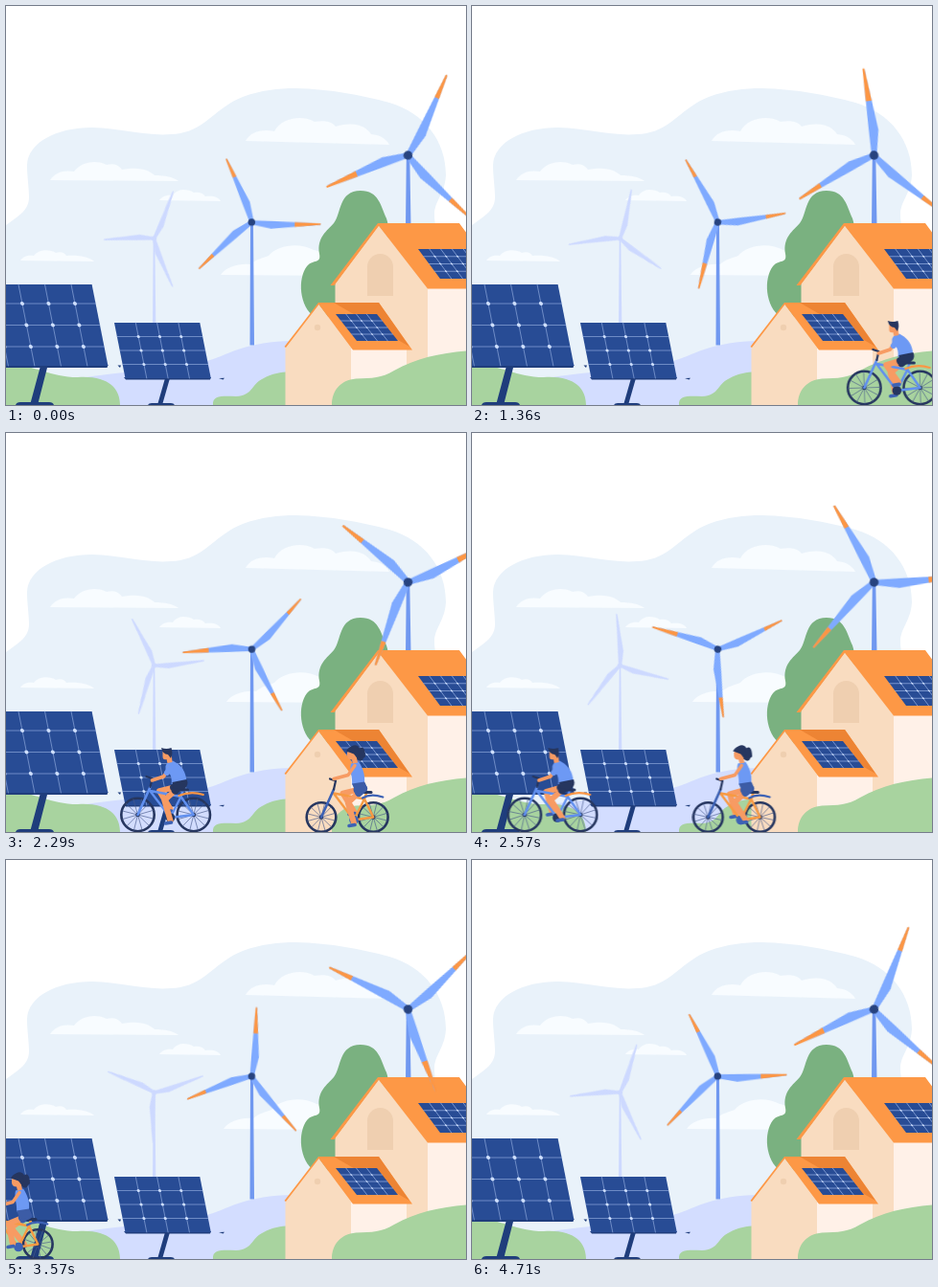
These frames come from a looping animation (480 by 417 pixels, 4780 ms). An HTML page:

```html
<!DOCTYPE html>
<html lang="en">
<head>
<meta charset="utf-8">
<title>Green energy village</title>
<style>
html, body { margin: 0; width: 100%; height: 100%; overflow: hidden; background: #fff; }
svg { display: block; width: 100vw; height: 100vh; }
.spin { animation: spin 4780ms -2ms infinite; }
.ride { animation: ride 4780ms -2ms infinite; }
.sway { animation: sway 4780ms -2ms infinite; }
/* The loop advances in 67 equal steps. */
@keyframes spin {
  0% { transform: rotate(0deg); animation-timing-function: steps(32); }
  47.7612% { transform: rotate(175.7deg); animation-timing-function: steps(18); }
  74.6269% { transform: rotate(272.3deg); animation-timing-function: steps(16); }
  98.5075% { transform: rotate(357.1deg); animation-timing-function: steps(1); }
  100% { transform: rotate(360deg); }
}
@keyframes ride {
  0% { transform: translateX(634px); animation-timing-function: steps(1); }
  11.9403% { transform: translateX(634px); animation-timing-function: steps(18); }
  38.806% { transform: translateX(265.5px); animation-timing-function: steps(6); }
  47.7612% { transform: translateX(137px); animation-timing-function: steps(9); }
  61.194% { transform: translateX(-49px); animation-timing-function: steps(9); }
  74.6269% { transform: translateX(-213px); animation-timing-function: steps(8); }
  86.5672%, 100% { transform: translateX(-320px); }
}
@keyframes sway {
  0%, 100% { transform: translateX(0); animation-timing-function: ease-in-out; }
  50% { transform: translateX(6px); animation-timing-function: ease-in-out; }
}
.rotor { --blade: #7faaff; --tip: #fc9644; --hub: #27437f; }
.pale { --blade: #cdd9ff; --tip: #cdd9ff; --hub: #cdd9ff; }
.line { fill: none; stroke-linecap: round; stroke-linejoin: round; }
</style>
</head>
<body>
<svg viewBox="0 0 480 417" preserveAspectRatio="none">
  <defs>
    <g id="rotor">
      <g id="blades"></g>
      <circle r="4.7" fill="var(--hub)"/>
    </g>
  </defs>

  <path fill="#e9f2fa" d="M0 229C14 219 24 213 24 200C24 188 22 180 22 166C23 143 52 127 90 127C125 128 150 138 182 133C209 128 219 106 247 95C266 88 284 86 302 86C340 87 370 93 400 101C437 112 459 141 459 177C458 196 447 204 447 218C447 228 450 236 452 250V417H0Z"/>

  <g fill="#f8fcff">
    <path d="M46 182C51 174 60 171 71 173C78 163 94 160 105 166C114 164 118 167 121 171C142 167 151 173 155 177C166 177 175 179 180 183Z"/>
    <path d="M250 141C255 131 268 128 280 131C287 117 309 113 322 121C333 119 340 121 344 126C364 120 376 126 381 134C391 135 397 139 400 145Z"/>
    <path d="M160 203C163 198 170 197 174 198C179 190 190 191 196 195C202 194 206 196 208 199C217 198 222 200 224 204Z"/>
    <path d="M15 266C18 261 24 260 29 261C34 254 46 254 52 258C58 256 62 259 63 261C77 260 88 263 92 267Z"/>
    <path class="sway" d="M224 281C230 273 241 269 255 270C262 264 267 264 274 261C284 249 307 247 321 255C336 257 345 269 350 282Z"/>
  </g>

  <path fill="#d3ddff" d="M70 390C130 380 170 381 213 370C235 363 250 351 300 350V417H70Z"/>
  <path fill="#cdd9ff" d="M153.700 245H155.300L156.300 331H153Z"/>
  <path fill="#7098f0" d="M255 228H258L259 354.500H254.500ZM417.800 158H421.300L422.500 230H417Z"/>

  <path fill="#7ab180" d="M322 325C306 314 304 285 314 272C321 264 329 270 327 259C324 242 335 235 342 227C350 217 347 193 370 193C389 193 391 209 397 222C403 238 400 300 380 325Z"/>
  <path fill="#a8d39f" d="M0 375C30 374 45 388 75 388C106 386 119 399 119 417H0ZM216 417C215 406 228 408 240 408C258 407 255 396 268 389.500C278 384 287 382.500 295 382.500V417Z"/>

  <!-- big house -->
  <path fill="#f9dcc0" d="M343.500 290L389 229L440 295V380H343.500Z"/>
  <path fill="#fff1e8" d="M440 294H480V390H440Z"/>
  <path fill="#fd9846" d="M388 227H473L480 236.500V295.500H440L389 229.800L342.500 292H338.500Z"/>
  <path fill="#efcfb0" d="M377 303V272.500A13.500 13.500 0 0 1 404 272.500V303Z"/>
  <g id="roofA"></g>

  <!-- small house -->
  <path fill="#f9dcc0" d="M291.500 356L326 311L361 358V417H291.500Z"/>
  <path fill="#fff1e8" d="M360 358H418V417H360Z"/>
  <path fill="#fd9846" d="M326 310H389L424 359.500H362L326.500 312L292 357L290.500 356Z"/>
  <path fill="#ed8434" d="M342 310H389L421 356L409 349Z"/>
  <circle cx="325" cy="336" r="3.200" fill="#efcfb0"/>
  <g id="roofB"></g>
  <path fill="#a8d39f" d="M340 417C340 402 349 391 365 389.500C383 389 391 389 405 381C428 368 452 363 480 360.500V417Z"/>

  <!-- ground panels -->
  <g fill="#1f3d7c">
    <path d="M36 376H43.500L33 417H25ZM10 417Q11 414 15 414H45Q49 414 50 417ZM166 389H171L163 417H158ZM148 417Q149 415 152 415H172Q175 415 176 417Z"/>
    <path d="M0 375H106.500L105.500 378H0ZM123 388H214L213 390.500H125ZM116.500 375.500H120L119 378ZM222 389L228 388.700L226.500 390.500Z"/>
  </g>
  <g id="panelA"></g>
  <g id="panelB"></g>

  <g transform="translate(154.500 243) rotate(22) scale(.58)"><use class="spin rotor pale" href="#rotor"/></g>
  <g transform="translate(256.400 226) rotate(91.600) scale(.79)"><use class="spin rotor" href="#rotor"/></g>
  <g transform="translate(419.500 156) rotate(248.700)"><use class="spin rotor" href="#rotor"/></g>

  <g class="ride">
    <g id="woman" transform="translate(192 401.500)"></g>
    <g id="man" transform="translate(.5 399)"></g>
  </g>
</svg>
<script>
const $ = id => document.getElementById(id);
const LOOP = 4780, STEPS = 67;
const NAVY = '#26365f', SKIN = '#f79b63', SHIRT = '#6d99f4', BLUE = '#3d62b5';

const line = (d, color, width, extra = '') =>
  `<path class="line" d="${d}" stroke="${color}" stroke-width="${width}" ${extra}/>`;
const shape = (d, color) => `<path d="${d}" fill="${color}"/>`;

// Uneven blades: [angle, length, start of the coloured end]
$('blades').innerHTML = [[0, 91, 57], [137, 92.800, 67], [246.600, 90, 64]].map(([a, len, s]) => {
  const left = -2.200 + 1.400 * (s - 30) / (len - 30);
  const right = 7.800 - 6.800 * (s - 26) / (len - 26);
  return `<g transform="rotate(${a})">` +
    shape(`M-2.500 0L-2.200 -30L-.8 ${-len}H1L7.800 -26L3.500 -3Z`, 'var(--blade)') +
    shape(`M${left} ${-s}L-1 ${-len}Q0 ${-len - 1} 1 ${-len}L${right} ${-s}Z`, 'var(--tip)') + '</g>';
}).join('');

// Slanted panel: xs and ys are the inner grid lines
function panel(id, x, y, x0, w, h, skew, xs, ys, dot) {
  const grid = xs.map(v => `M${v} 0V${h}`).concat(ys.map(v => `M${x0} ${v}H${x0 + w}`)).join('');
  const dots = xs.flatMap(a => ys.map(b => `M${a} ${b}h.01`)).join('');
  $(id).innerHTML = `<g transform="translate(${x} ${y}) skewX(${skew})">` +
    `<rect x="${x0}" width="${w}" height="${h}" fill="#284c95"/>` +
    line(grid, '#a3bbeb', .55) + line(dots, '#cfe0ff', dot) + '</g>';
}
const every = (step, n) => Array.from({ length: n }, (_, i) => step * (i + 1));
panel('panelA', 13, 291, -40, 116.600, 85, 11.200, [-27.500, 0, 27.500, 55], [20, 42.500, 65], 4);
panel('panelB', 113, 331, 0, 89.300, 58, 11.200, every(22.300, 3), every(14.500, 3), 3.200);
panel('roofA', 430, 254, 0, 60, 31, 36.600, every(11.800, 4), every(7.750, 3), 1.900);
panel('roofB', 344, 322, 0, 43, 28, 38.200, every(10.750, 3), every(7, 3), 1.700);

function wheel(x, r) {
  const spokes = every(30, 6).map(a => `<path d="M${-r} 0H${r}" transform="rotate(${a})"/>`).join('');
  return `<g transform="translate(${x} 0)"><circle r="${r}" fill="none" stroke="${NAVY}" stroke-width="2.600"/>` +
    `<g class="spokes" stroke="#4a5c8c" stroke-width=".6">${spokes}</g><circle r="2.200" fill="${NAVY}"/></g>`;
}

function bike(rear, r, frame, fork, fender) {
  return wheel(0, r) + wheel(rear, r) +
    line(`M12 -26L34 3L${rear} 0L45 -19L34 3M13 -25L45 -19L47 -25`, frame, 2.400) +
    line('M0 0L13 -29', fork, 2.600) +
    line(`M43 -20Q${rear - 3} -25 ${rear + 10} -21`, fender, 2.200) +
    line('M9 -40L15 -38L13 -29', NAVY, 2.200) +
    line('M43 -26H52', NAVY, 3);
}

const leg = (cls, shorts) => `<g class="${cls}">` + line('', SKIN, 6, 'data-part="leg"') +
  line('', shorts, 8, 'data-part="thigh"') + line('', BLUE, 3.600, 'data-part="shoe"') + '</g>';
const crank = color => `<circle cx="34" cy="3" r="4.800" fill="${color}"/>`;

$('man').innerHTML = leg('far', NAVY) + bike(58.300, 17.200, '#6190ef', '#6190ef', '#fc9644') +
  crank(NAVY) + leg('near', NAVY) +
  shape('M29 -51C31 -56 35 -58 39 -55C46 -51 50 -45 51 -35L35 -32C36 -39 34 -44 29 -47Z', SHIRT) +
  shape('M36 -34L51 -37C53 -33 52 -29 47 -26L37 -28Z', NAVY) +
  line('M33 -49L27 -40L15 -36', SKIN, 3.600) +
  line('M35 -50L30.500 -44', SHIRT, 6) +
  shape('M26 -66H35L36 -55L31 -54L30 -58Q26 -57 26 -61Z', SKIN) +
  shape('M24.500 -70Q30 -68 35 -70Q37 -64 34.500 -59L31.500 -63Q26 -63 24.500 -70Z', NAVY);

$('woman').innerHTML = leg('far', '#3c5ca6') + bike(54.300, 15.300, '#f79a43', BLUE, BLUE) +
  crank(BLUE) + leg('near', '#3c5ca6') +
  shape('M29 -71C33 -78 39 -75 40 -72C44 -75 46 -70 46 -63C44 -64 44 -58 40 -59L35 -62Z', NAVY) +
  shape('M31 -56L39 -58C43 -52 46 -45 45 -36L32 -34C33 -42 29 -49 31 -56Z', SHIRT) +
  shape('M32 -35L45 -37C48 -33 48 -28 44 -26L35 -28Z', '#3c5ca6') +
  line('M35 -54L28 -44L13 -40', SKIN, 3.400) +
  shape('M27 -68Q31 -70 36 -67L38 -57L33 -56L32 -60Q27.500 -60 27 -64Z', SKIN) +
  shape('M26 -69Q30 -76 37 -73Q41 -68 38 -61L34 -66Z', NAVY);

// Two-bone leg from the saddle to a turning pedal
function poseLeg(g, angle) {
  const hx = 44, hy = -30, bone = 22;
  const fx = 34 + 6 * Math.cos(angle), fy = 6 * Math.sin(angle);
  const dx = fx - hx, dy = fy - hy, d = Math.hypot(dx, dy);
  const bend = Math.sqrt(Math.max(0, bone * bone - d * d / 4));
  const kx = hx + dx / 2 - dy / d * bend, ky = hy + dy / 2 + dx / d * bend;
  const set = (part, path) => g.querySelector(`[data-part=${part}]`).setAttribute('d', path);
  set('leg', `M${hx} ${hy}L${kx} ${ky}L${fx} ${fy}`);
  set('thigh', `M${hx} ${hy}L${hx + (kx - hx) * .3} ${hy + (ky - hy) * .3}`);
  set('shoe', `M${fx + 1} ${fy + 2}L${fx - 5} ${fy + 3}`);
}

const start = performance.now();
const spokes = document.querySelectorAll('.spokes');
function draw() {
  const t = (performance.now() - start + 2) % LOOP;
  const step = Math.floor(t / LOOP * STEPS);
  const turn = Math.PI - (step - 26) * Math.PI / 12;
  for (const id of ['man', 'woman']) {
    poseLeg($(id).querySelector('.near'), turn);
    poseLeg($(id).querySelector('.far'), turn + Math.PI);
  }
  spokes.forEach(s => s.setAttribute('transform', `rotate(${-step * 68})`));
  requestAnimationFrame(draw);
}
draw();
</script>
</body>
</html>
```
